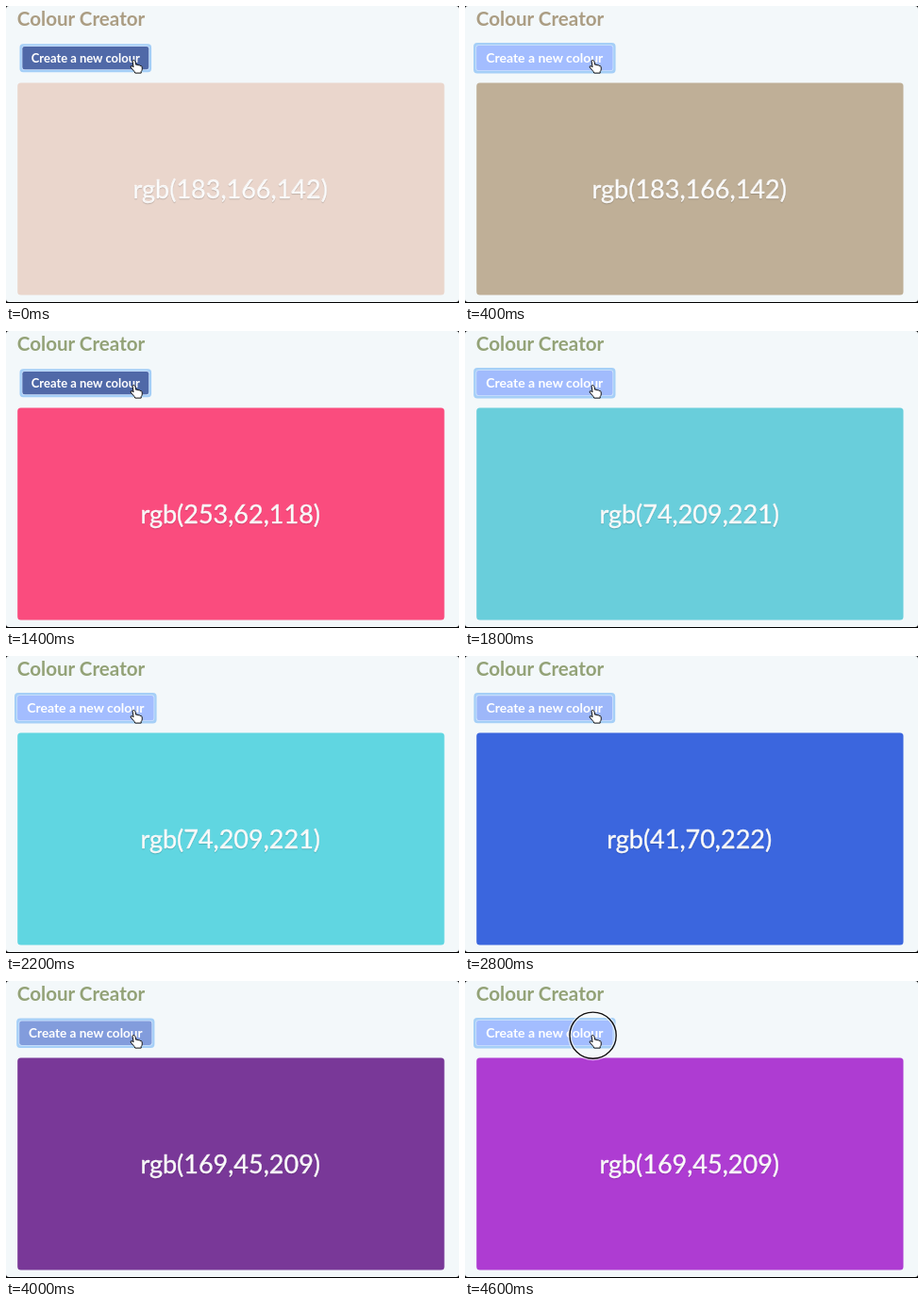
Write an HTML page that moves like this. It is 480 px wide and 315 px high and loops after 4.7 s.

```html
<!DOCTYPE html>
<html lang="en">
<head>
<meta charset="utf-8">
<title>Colour Creator</title>
<style>
  html, body { margin: 0; width: 100%; height: 100%; overflow: hidden; background: #000; }
  svg { display: block; width: 480px; height: 315px; font-family: Lato, "Open Sans", sans-serif; }
  text { fill: #fff; }
  .mid { text-anchor: middle; }
  #title { font-size: 20.6px; font-weight: 700; }
  #label { font-size: 27px; stroke: #fff; stroke-width: .4px; text-shadow: 0 1px 1px rgba(0, 0, 0, .15); }
  #button text { font-size: 14px; font-weight: 700; }
</style>
</head>
<body>
<svg viewBox="0 0 480 315">
  <rect width="480" height="314" rx="3" fill="#f3f8fa"/>
  <text id="title" x="11.8" y="21">Colour Creator</text>

  <g id="button">
    <rect x="-75.3" y="-16.2" width="150.6" height="32.4" rx="4" fill="#a5cff7"/>
    <rect x="-73" y="-13.9" width="146" height="27.8" rx="3" fill="#cfe2fd"/>
    <rect id="face" x="-72.2" y="-13.1" width="144.4" height="26.2" rx="2.5"/>
    <text class="mid" y="5">Create a new colour</text>
  </g>

  <rect id="panel" x="12.2" y="81.5" width="452.3" height="225" rx="3.5"/>
  <text id="label" class="mid" x="237.7" y="204"></text>

  <g id="ring" fill="none">
    <circle cx="135.6" cy="57.7" r="24.6" stroke="#fff" stroke-opacity=".6" stroke-width="4"/>
    <circle cx="135.6" cy="57.7" r="24.6" stroke="#111" stroke-width="1.4"/>
  </g>
  <path fill="#fff" stroke="#111" stroke-linejoin="round" d="M134 58.2q1.4-1.6 2.8.2l1 4q1.2-.9 2.2.4
    q1.2-.7 2.1.6q1.7-.4 2 1.3l.2 2.2q-.1 1.7-1.1 2.6v1.6h-6.4l-.8-1.6-3.8-4.4q-.6-1.9 1.6-1.3l1.3.9z"/>
</svg>
<script>
const LOOP = 4700, STEP = 100, PANEL_FADE = 500, BUTTON_FADE = 430;
const LIT = [163, 189, 255], PRESSED = [80, 105, 168], START = [234, 214, 204];

// down/up: mouse times; name: colour in the label; shown: colour on screen
const clicks = [
  { down: -100, up: 0,    name: "183,166,142", shown: [190, 174, 150] },
  { down: 500,  up: 640,  name: "253,62,118",  shown: [250, 76, 126] },
  { down: 1300, up: 1450, name: "74,209,221",  shown: [96, 214, 225] },
  { down: 2300, up: 2510, name: "41,70,222",   shown: [54, 85, 222] },
  { down: 2900, up: 3010, name: "56,44,86",    shown: [66, 51, 91] },
  { down: 3700, up: 3850, name: "169,45,209",  shown: [174, 60, 210] },
  { down: 4600, up: LOOP }
];

const el = id => document.getElementById(id);
const mix = (a, b, k) => a + (b - a) * k;
const rgb = (a, b, k) => `rgb(${a.map((v, i) => Math.round(mix(v, b[i], k)))})`;

// CSS "ease": cubic-bezier(.25, .1, .25, 1)
function ease(x) {
  if (x >= 1) return 1;
  const curve = (s, p, q) => 3 * (1 - s) ** 2 * s * p + 3 * (1 - s) * s * s * q + s ** 3;
  let lo = 0, hi = 1;
  for (let i = 0; i < 20; i++) {
    const m = (lo + hi) / 2;
    if (curve(m, .25, .25) < x) lo = m; else hi = m;
  }
  return curve(lo, .1, 1);
}

function draw(t) {
  const i = clicks.findLastIndex(c => c.up <= t);
  const { up, name, shown } = clicks[i], next = clicks[i + 1];
  const lit = t >= next.down + STEP ? 0 : ease((t - up) / BUTTON_FADE);

  el("title").style.fill = t < 700 ? "#ab9d83" : "#93a277";
  el("panel").style.fill = rgb(i ? clicks[i - 1].shown : START, shown, ease((t - up) / PANEL_FADE));
  el("label").textContent = `rgb(${name})`;
  el("face").style.fill = rgb(PRESSED, LIT, lit);
  el("button").setAttribute("transform", `translate(84.3 55.2) scale(${mix(.927, 1, lit)})`);
  el("ring").style.display = t >= next.down && t < next.down + STEP ? "" : "none";
}

const begin = performance.now();
function tick() {
  const t = (performance.now() - begin) % LOOP;
  draw(Math.floor(t / STEP) * STEP);
  requestAnimationFrame(tick);
}
tick();
</script>
</body>
</html>
```
